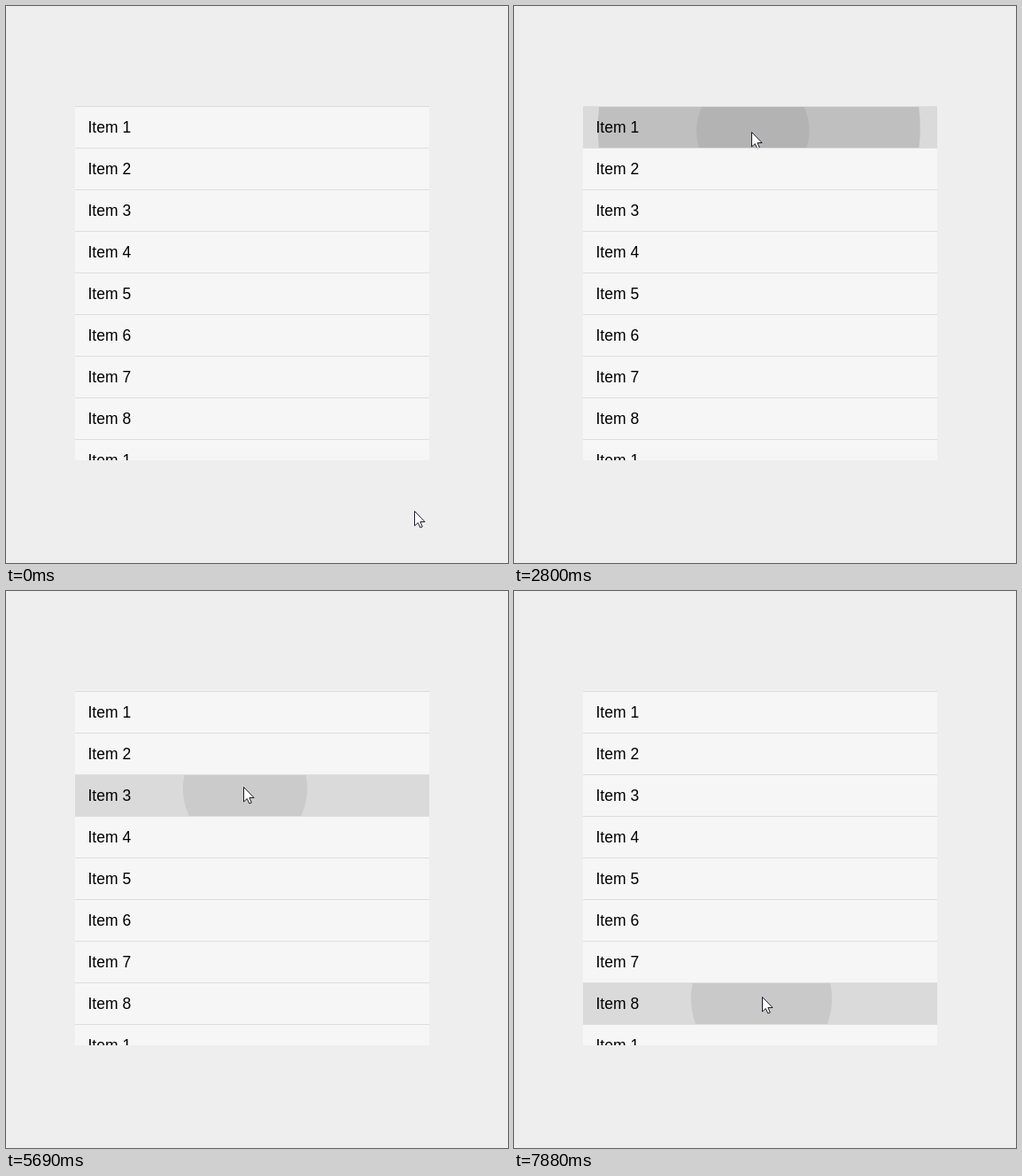
Recreate the animation shown at these times as an HTML page with a canvas. Size 567 by 629 pixels, loop 8000 ms.

```html
<!DOCTYPE html>
<html lang="en">
<head>
<meta charset="utf-8">
<title>List ripple</title>
<style>
  html, body { margin: 0; width: 100%; height: 100%; overflow: hidden; background: #eee; }
  canvas { position: absolute; left: 0; top: 0; }
  #list {
    position: absolute; left: 78px; top: 113px; width: 400px; height: 400px;
    overflow: hidden; font: 17.5px "Liberation Sans", Arial, sans-serif; color: #000;
  }
  #list div { height: 46px; line-height: 46px; padding-left: 14.5px; border-top: 1px solid #ddd; }
</style>
</head>
<body>
<canvas id="stage" width="567" height="629"></canvas>
<div id="list"></div>
<script>
const LOOP = 8000, FRAME = 132;
const LEFT = 78, TOP = 113, SIZE = 400, PITCH = 47;
const ENTER = 500, BURST = 2800;
const ctx = document.getElementById('stage').getContext('2d');
const list = document.getElementById('list');
for (let i = 0; i < 9; i++) {
  const row = document.createElement('div');
  row.textContent = 'Item ' + (i % 8 + 1);
  list.append(row);
}

// Each tap selects a row; its ripple is already `age` old when first seen
const taps = [
  { at: 1700, row: 0, x: 268, y: 142, age: 90 },
  { at: 5000, row: 1, x: 268, y: 183, age: 148 },
  { at: 5690, row: 2, x: 268, y: 221, age: 80 },
  { at: 6230, row: 3, x: 274, y: 271, age: 71 },
  { at: 7130, row: 6, x: 279, y: 428, age: 85 },
  { at: 7880, row: 7, x: 280, y: 458, age: 94 }
];
// Quick repeated presses on the first row
const presses = [2354, 2729, 3041, 3485, 3636];
const clockStarts = [0, ENTER, BURST, ...taps.map(tap => tap.at)];

const clamp = v => Math.max(0, Math.min(1, v));
const lerp = (a, b, k) => a + (b - a) * k;
const bezier = (a, b, c, d, k) => {
  const m = 1 - k;
  return m * m * m * a + 3 * m * m * k * b + 3 * m * k * k * c + k * k * k * d;
};

// The screen refreshes in even steps, restarted by each action
function snap(t) {
  const start = Math.max(...clockStarts.filter(s => s <= t));
  return start + Math.floor((t - start) / FRAME) * FRAME;
}

function pointerAt(t) {
  const next = taps.findIndex(tap => tap.at > t);
  if (next === 0) {
    const k = t < ENTER ? 0 : clamp((t - ENTER + FRAME) / (6 * FRAME));
    return [bezier(461, 530, 575, 269, k), bezier(570, 500, 150, 143, k)];
  }
  if (next < 0) return [taps.at(-1).x, taps.at(-1).y];
  const from = taps[next - 1], to = taps[next];
  const start = Math.max(from.at + FRAME, to.at - 700);
  const k = clamp((t - start) / 200);
  return [lerp(from.x, to.x, k), lerp(from.y, to.y, k)];
}

// The wave slows as it spreads and drifts to the middle of its row
function drawRipple({ row, x, y }, age, life) {
  if (age <= 0 || age >= life) return;
  const radius = 200 * (1 - Math.exp(-age / 185));
  const alpha = radius * 0.00098 * clamp((life - age) / (life * 0.6));
  const drift = Math.pow(radius / 200, 1.5);
  ctx.fillStyle = `rgba(0,0,0,${alpha})`;
  ctx.beginPath();
  ctx.arc(lerp(x, LEFT + SIZE / 2, drift), lerp(y, TOP + 24 + row * PITCH, drift), radius, 0, Math.PI * 2);
  ctx.fill();
}

function drawSelected(tap, t) {
  const y = TOP + 1 + tap.row * PITCH;
  ctx.save();
  ctx.beginPath();
  ctx.rect(LEFT, y, SIZE, PITCH - 1);
  ctx.clip();
  ctx.fillStyle = '#dadada';
  ctx.fillRect(LEFT, y, SIZE, PITCH);
  drawRipple(tap, t - tap.at + tap.age, 410);
  if (tap.row === 0) for (const press of presses) drawRipple(tap, t - press, 775);
  ctx.restore();
}

function drawPointer(x, y) {
  ctx.save();
  ctx.translate(Math.round(x) + 0.5, Math.round(y) + 0.5);
  ctx.fillStyle = '#fff';
  ctx.strokeStyle = '#1a1a2a';
  const arrow = new Path2D('M0 0V16.5L3.8 13L6.4 18.5L8.8 17.5L6.4 12H11.6Z');
  ctx.fill(arrow);
  ctx.stroke(arrow);
  ctx.restore();
}

function draw(time) {
  const t = snap(time % LOOP);
  ctx.fillStyle = '#eee';
  ctx.fillRect(0, 0, 567, 629);
  ctx.fillStyle = '#f6f6f6';
  ctx.fillRect(LEFT, TOP, SIZE, SIZE);
  const selected = taps.filter(tap => tap.at <= t).pop();
  if (selected) drawSelected(selected, t);
  drawPointer(...pointerAt(t));
}

const begin = performance.now();
function frame() {
  draw(performance.now() - begin);
  requestAnimationFrame(frame);
}
frame();
</script>
</body>
</html>
```
